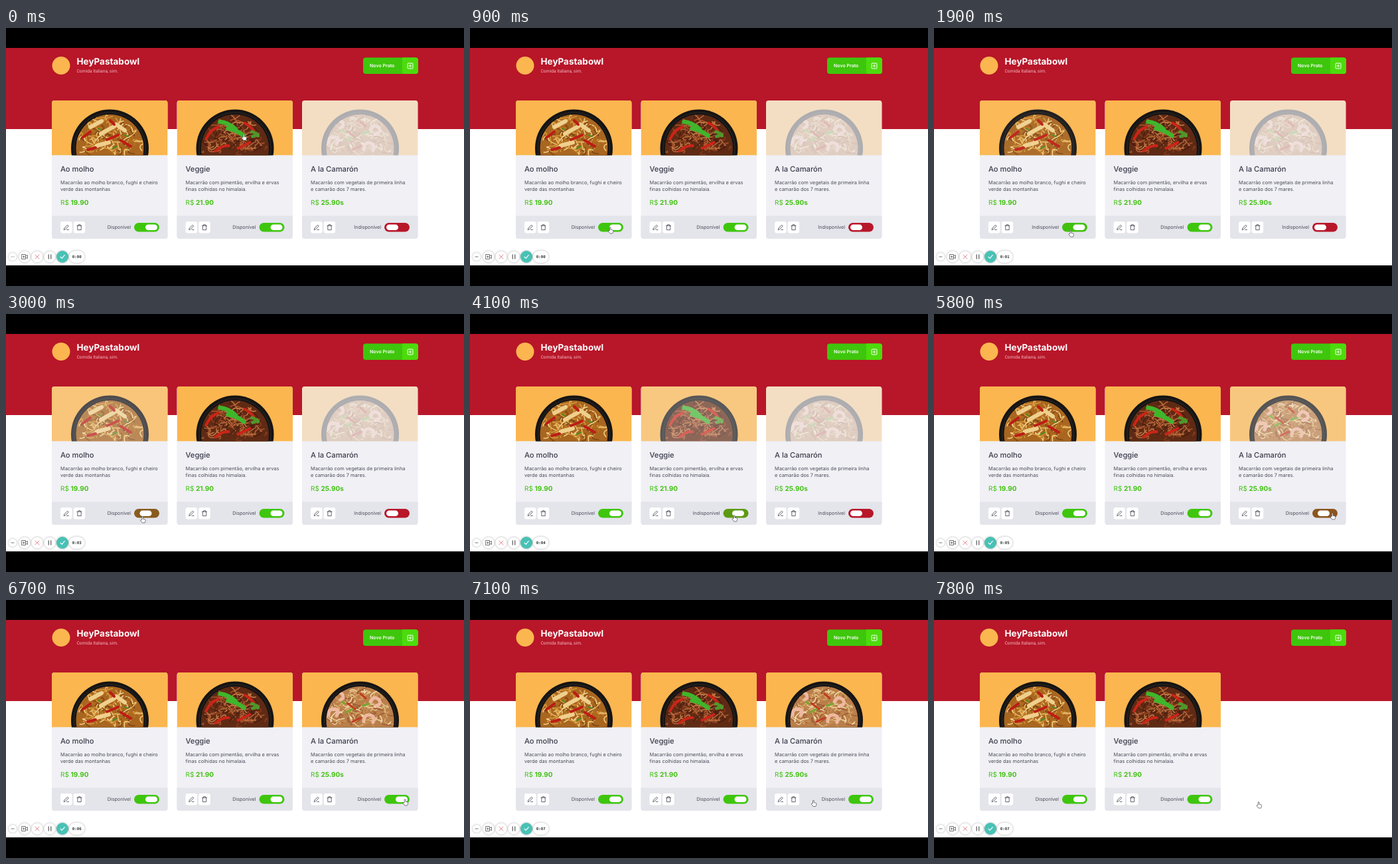
Write an HTML page that moves like this. It is 690 px wide and 388 px high and loops after 8000 ms.

```html
<!DOCTYPE html>
<html lang="pt">
<head>
<meta charset="utf-8">
<title>Cardápio</title>
<style>
  html, body { margin: 0; width: 100%; height: 100%; overflow: hidden; background: #000; }
  svg { display: block; }
  text { font-family: Inter, sans-serif; text-rendering: geometricPrecision; }
  .title { font-size: 11.2px; font-weight: 500; fill: #3d3d4d; }
  .desc { font-size: 7.4px; fill: #4c4c59; }
  .price { font-size: 10px; fill: #43c212; }
  .label { font-size: 7.2px; fill: #4c4c59; text-anchor: end; }
  .line { fill: none; stroke: #3d3d4d; stroke-linecap: round; stroke-linejoin: round; }
  .pill { fill: #fff; filter: drop-shadow(0 .5px 1.5px #0005); }
</style>
</head>
<body>
<svg id="stage" width="690" height="388" viewBox="0 0 690 388"></svg>
<script>
const LOOP = 8000, STEP = 100, FLIP = 280, REMOVED = 7500;
const GREEN = [62, 198, 12], RED = [184, 22, 41];

const dishes = [
  { name: 'Ao molho', price: '19.90', on: true, flips: [1890, 2890],
    lines: ['Macarrão ao molho branco, fughi e cheiro', 'verde das montanhas'],
    base: '#a9661f', noodles: ['#d99b3c', '#e9bd67', '#b8701f', '#f1d08a', '#7d4515'],
    bits: [['#f0cf8c', 6, 'M58 40l17-9M74 50l20-11M97 36l13 9M68 68l18-5'],
           ['#bd1d16', 4, 'M46 56l12-9M83 59l17-7M104 60l15 9M88 30l6 6M54 74l12-3'],
           ['#4d8a25', 2, 'M70 42l5 3M110 52l5 2M92 72l6-3']] },
  { name: 'Veggie', price: '21.90', on: true, flips: [4030, 4722],
    lines: ['Macarrão com pimentão, ervilha e ervas', 'finas colhidas no himalaia.'],
    base: '#5f2a14', noodles: ['#a9552a', '#8a3d1c', '#c47a45', '#4a1d10', '#b5653a'],
    bits: [['#cc2418', 4, 'M44 58q6-14 18-18M92 72l18-9M58 76q10-9 20-8M102 34q12 6 16 16'],
           ['#3fb52c', 6.5, 'M65 32q12 1 23 11M77 42q12 2 24 11'],
           ['#4c9a2a', 5, 'M113 47l3 1M120 50l2 3M114 54l3-1']] },
  { name: 'A la Camarón', price: '25.90s', on: false, flips: [5700],
    lines: ['Macarrão com vegetais de primeira linha', 'e camarão dos 7 mares.'],
    base: '#b97f4a', noodles: ['#e6c48c', '#f1dcb0', '#c98f55', '#d9a866', '#9c5a33'],
    bits: [['#c43a20', 3, 'M68 46l12 9M88 32l8 7M76 74l12-6'],
           ['#74a832', 3, 'M66 60l10-5M92 50l9-3M60 44l5 3'],
           ['#efb8a0', 5, 'M48 36q5-11 13-3q3 6-3 8M40 64q0-11 10-9q7 4 2 10M103 44q5-10 13-3q4 7-4 9M93 74q0-12 10-10q8 3 4 11']] },
];

function seeded(seed) {
  return () => (seed = (seed * 16807) % 2147483647) / 2147483647;
}

const path = (d, color, width, extra = '') =>
  `<path d="${d}" fill="none" stroke="${color}" stroke-width="${width}" stroke-linecap="round" ${extra}/>`;

function food(dish, i) {
  const rnd = seeded(731 + i * 97);
  const spread = n => ((rnd() - .5) * n).toFixed(1);
  let strands = '';
  for (let k = 0; k < 110; k++) {
    const angle = Math.PI * (1 + rnd()), r = 50 * Math.sqrt(rnd());
    const x = (87.5 + r * Math.cos(angle)).toFixed(1), y = (77 + r * Math.sin(angle)).toFixed(1);
    strands += path(`M${x} ${y}q${spread(22)} ${spread(22)} ${spread(34)} ${spread(22)}`,
      dish.noodles[k % 5], 1.5);
  }
  return `<g clip-path="url(#photo)"><g id="photo${i}">
    <rect width="174.5" height="82.5" fill="#fbb64f"/>
    <circle cx="87.5" cy="72" r="58.5" fill="#161413"/>
    <circle cx="87.5" cy="72" r="54" fill="none" stroke="#2c2928"/>
    <g clip-path="url(#bowl)"><rect x="30" y="15" width="115" height="70" fill="${dish.base}"/>
      ${strands}${dish.bits.map(([c, w, d]) => path(d, c, w)).join('')}</g>
  </g></g>`;
}

function card(dish, i) {
  return `<g id="card${i}" transform="translate(${69 + i * 188.5} 109)">
    <rect width="174.5" height="208" rx="4" fill="#f0f0f5"/>
    ${food(dish, i)}
    <path d="M0 173.5h174.5V204a4 4 0 0 1-4 4H4a4 4 0 0 1-4-4z" fill="#e4e4eb"/>
    <text class="title" x="13" y="107">${dish.name}</text>
    ${dish.lines.map((s, n) => `<text class="desc" x="13" y="${125.5 + n * 10.5}">${s}</text>`).join('')}
    <text class="price" x="13" y="157">R$ <tspan x="28.5" font-weight="700">${dish.price}</tspan></text>
    <rect x="13" y="182" width="17.5" height="17.5" rx="3" fill="#fff"/>
    <rect x="32.7" y="182" width="17.5" height="17.5" rx="3" fill="#fff"/>
    <path class="line" stroke-width=".8" d="M18.3 194.2l.6-2.2 4.8-4.8 1.6 1.6-4.8 4.8zM22.6 194.3h3"/>
    <path class="line" stroke-width=".8" d="M38 188.2h7M40 188v-1.2h3v1.2M38.8 188.4v6.2h5.4v-6.2"/>
    <text class="label" id="label${i}" x="119" y="193.3"></text>
    <rect id="track${i}" x="124" y="184" width="38" height="13.6" rx="6.8"/>
    <rect id="knob${i}" y="186.5" width="18" height="8.6" rx="4.3" fill="#fff"/>
  </g>`;
}

const round = (x, r = 8.6, fill = '') =>
  `<circle class="pill" cx="${x}" cy="344" r="${r}" ${fill && `style="fill:${fill}"`}/>`;

const $ = id => document.getElementById(id);

$('stage').innerHTML = `
  <clipPath id="photo"><path d="M0 82.5V4a4 4 0 0 1 4-4h166.500a4 4 0 0 1 4 4v78.500z"/></clipPath>
  <clipPath id="bowl"><circle cx="87.5" cy="72" r="51"/></clipPath>
  <rect width="690" height="388"/>
  <rect y="30" width="690" height="327" fill="#fff"/>
  <rect y="30" width="690" height="122" fill="#b81629"/>
  <circle cx="83" cy="56.500" r="13.500" fill="#fbb64f"/>
  <text x="106.500" y="55" font-size="13.500" font-weight="700" fill="#fff">HeyPastabowl</text>
  <text x="106.500" y="67" font-size="6.700" fill="#f0b9bf" style="font-family:Roboto,sans-serif">Comida Italiana, sim.</text>
  <rect x="538" y="44.500" width="83" height="24.500" rx="4" fill="#3ec60c"/>
  <path d="M597 44.500h20a4 4 0 0 1 4 4v16.500a4 4 0 0 1-4 4h-20z" fill="#4cdb0c"/>
  <text x="548" y="59.200" font-size="7" font-weight="600" fill="#fff">Novo Prato</text>
  <rect x="605" y="53" width="8" height="8" rx="1" fill="none" stroke="#fff"/>
  ${path('M609 55v4M607 57h4', '#fff', .9)}
  ${dishes.map(card).join('')}
  ${round(10, 6)}${round(28)}${round(47)}${round(66)}${round(85, 9, '#48c2b5')}
  <path id="menu" d="M7.500 344h5" stroke="#777"/>
  <path class="line" stroke-width=".9" style="stroke:#666" d="M24 340.500h5.500v7h-5.500zM29.500 343l3-1.500v5l-3-1.500M25.300 344h2.800M26.700 342.600v2.800"/>
  ${path('M44 341l6 6M50 341l-6 6', '#f08c90', 1)}
  ${path('M64.300 341v6M67.700 341v6', '#777', 1.500)}
  ${path('M82 344.200l2.200 2.200 4-4.800', '#fff', 1.200)}
  <rect class="pill" x="95" y="335" width="23.500" height="18" rx="9"/>
  <text id="clock" x="106.700" y="346.200" font-size="5.800" font-weight="600" fill="#333" text-anchor="middle" style="font-family:'DejaVu Sans Mono',monospace"></text>
  <path id="cursor" d="M-1.800 .5v-4a.9.9 0 0 1 1.800 0v2.700l2.500.6q1.300.3 1.200 1.600l-.5 2.300-.7 1.300h-3.600l-2.600-3.200q-.5-1.200.6-1.200z"
    fill="#fff" stroke="#444" stroke-width=".7" stroke-linejoin="round"/>`;

const clamp = x => Math.max(0, Math.min(1, x));
const mix = (a, b, p) => a + (b - a) * p;

// Pointer stops: time, x, y
const route = [[0, 359, 164], [100, 359, 164], [1000, 207, 309], [3100, 206.500, 309],
  [3900, 399, 307], [4200, 399, 307], [4700, 419, 309], [4900, 419, 309],
  [5600, 601, 304], [6700, 602, 304], [7300, 489, 306], [7500, 490, 308], [LOOP, 490, 308]];

function pointer(t) {
  const n = route.findIndex(stop => stop[0] > t);
  const [t0, x0, y0] = route[n - 1], [t1, x1, y1] = route[n];
  const u = (t - t0) / (t1 - t0), p = u * u * (3 - 2 * u);
  return [mix(x0, x1, p), mix(y0, y1, p)];
}

function drawCard(dish, i, t) {
  const done = dish.flips.filter(at => at <= t);
  const on = dish.on !== (done.length % 2 === 1);
  const p = done.length ? clamp((t - done.at(-1)) / FLIP) : 1;
  const eased = 1 - (1 - p) ** 2;
  const level = on ? p : 1 - p;
  $('photo' + i).setAttribute('opacity', mix(.3, 1, on ? eased : 1 - eased));
  $('label' + i).textContent = on ? 'Disponível' : 'Indisponível';
  $('track' + i).setAttribute('fill', `rgb(${RED.map((c, k) => Math.round(mix(c, GREEN[k], level)))})`);
  $('knob' + i).setAttribute('x', 124 + mix(3, 17, level));
}

function draw(now) {
  const t = Math.floor((now % LOOP) / STEP) * STEP;
  dishes.forEach((dish, i) => drawCard(dish, i, t));
  $('card2').style.display = t >= REMOVED ? 'none' : '';
  $('clock').textContent = '0:0' + Math.floor(t / 1000);
  $('menu').setAttribute('stroke-dasharray', t < STEP ? '1 1' : 'none');
  $('cursor').setAttribute('transform', `translate(${pointer(t)})`);
  requestAnimationFrame(draw);
}
requestAnimationFrame(draw);
</script>
</body>
</html>
```
